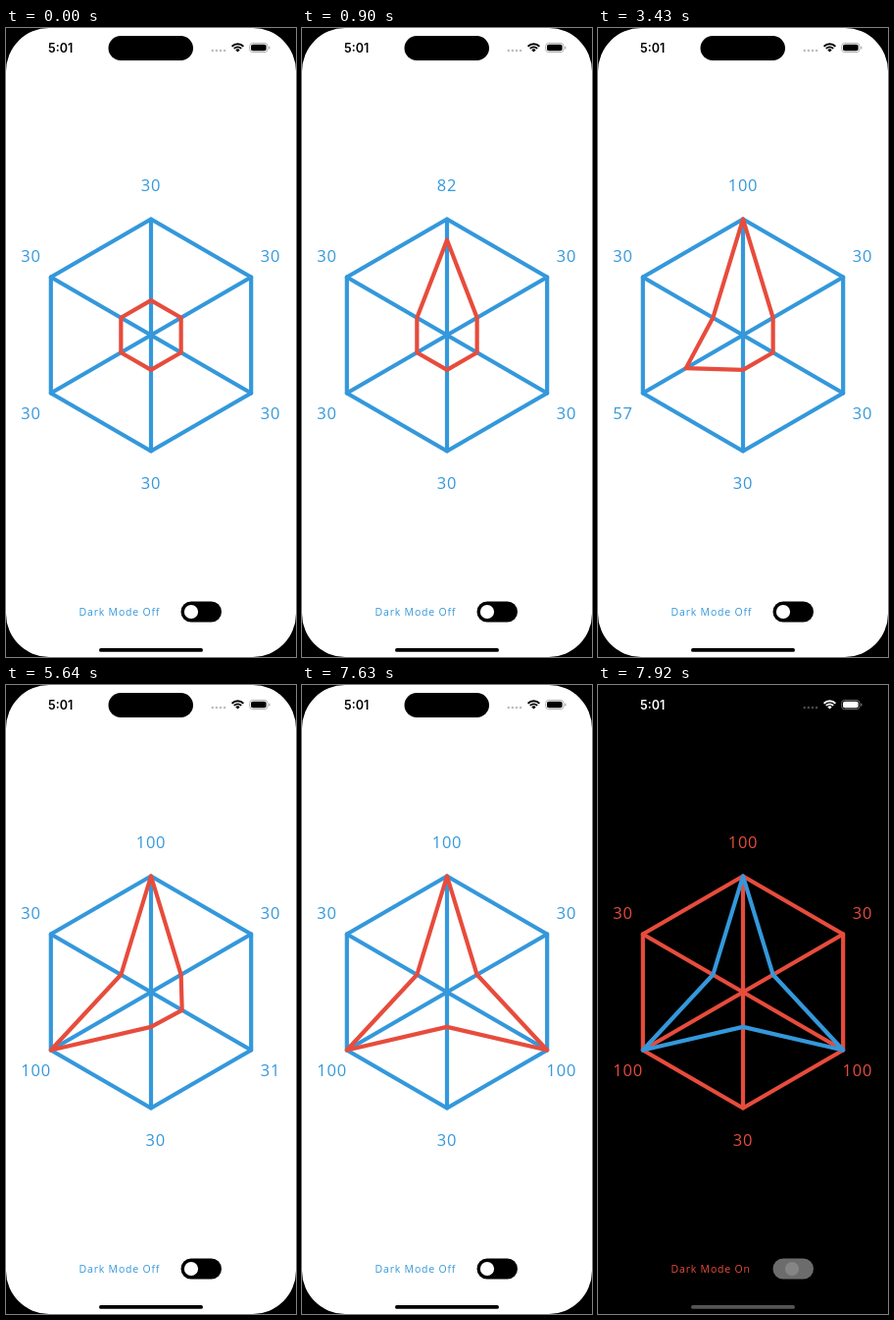
Animation, 296 px wide and 640 px high, one loop 8000 ms. Source, as an HTML page with a canvas:

```html
<!DOCTYPE html>
<html lang="en">
<head>
<meta charset="utf-8">
<title>Radar chart</title>
<style>
html, body { margin: 0; width: 100%; height: 100%; overflow: hidden; background: #000; }
canvas { display: block; width: 296px; height: 640px; }
</style>
</head>
<body>
<canvas id="stage"></canvas>
<script>
const W = 296, H = 640, LOOP = 8000;
const CX = 148, CY = 312.5, R = 118;
const BLUE = '#3498db', RED = '#e74c3c';

const canvas = document.getElementById('stage');
const ctx = canvas.getContext('2d');
const dpr = window.devicePixelRatio || 1;
canvas.width = W * dpr;
canvas.height = H * dpr;

// Held states: start time, top, lower left and lower right values
const STEPS = [
  [0, 30, 30, 30], [640, 31, 30, 30], [770, 57, 30, 30], [900, 82, 30, 30],
  [3320, 100, 31, 30], [3430, 100, 57, 30],
  [5640, 100, 100, 31], [5770, 100, 100, 57], [5880, 100, 100, 84],
  [7630, 100, 100, 100]
];
const FADE_AT = 7810, DARK_AT = 7920;

function pill(x, y, w, h, color, r = h / 2) {
  ctx.fillStyle = color;
  ctx.beginPath();
  ctx.roundRect(x, y, w, h, r);
  ctx.fill();
}

function disc(x, y, r, color) {
  ctx.fillStyle = color;
  ctx.beginPath();
  ctx.arc(x, y, r, 0, Math.PI * 2);
  ctx.fill();
}

function text(str, x, y, font, color, align = 'left', spacing = 0) {
  ctx.font = font;
  ctx.letterSpacing = spacing + 'px';
  ctx.textAlign = align;
  ctx.fillStyle = color;
  ctx.fillText(str, x, y);
}

// Corner i counts clockwise from the top
function corner(i, value) {
  const a = i * Math.PI / 3 - Math.PI / 2, r = R * value / 100;
  return [CX + r * Math.cos(a), CY + r * Math.sin(a)];
}

function polygon(values, color) {
  ctx.strokeStyle = color;
  ctx.beginPath();
  values.forEach((v, i) => ctx.lineTo(...corner(i, v)));
  ctx.closePath();
  ctx.stroke();
}

function chart(values, grid, shape) {
  ctx.lineWidth = 4.2;
  ctx.lineJoin = ctx.lineCap = 'round';
  polygon(Array(6).fill(100), grid);
  ctx.beginPath();
  for (let i = 0; i < 3; i++) {
    ctx.moveTo(...corner(i, 100));
    ctx.lineTo(...corner(i + 3, 100));
  }
  ctx.stroke();
  polygon(values, shape);
}

function labels(v, color) {
  const put = (n, x, y, align) =>
    text(String(n), x, y, '16.5px "Open Sans", sans-serif', color, align, 0.8);
  // A wider value on one side of the bottom row pushes its middle label
  const shift = 4.8 * ((v[4] > 99) - (v[2] > 99));
  put(v[0], 148, 166, 'center');
  put(v[1], 280.3, 237.5, 'right');
  put(v[2], 280.3, 398, 'right');
  put(v[3], 148 + shift, 469, 'center');
  put(v[4], 15.3, 398, 'left');
  put(v[5], 15.3, 237.5, 'left');
}

function statusBar(color, dots, rim) {
  text('5:01', 43, 24.5, '600 12.5px Inter, sans-serif', color);
  for (let i = 0; i < 4; i++) disc(210.8 + i * 4.1, 23.1, 1.25, dots);

  const from = -Math.PI * 0.75, to = -Math.PI * 0.25;
  ctx.strokeStyle = ctx.fillStyle = color;
  ctx.lineWidth = 1.9;
  ctx.lineCap = 'butt';
  for (const r of [8.3, 5.2]) {
    ctx.beginPath();
    ctx.arc(236.5, 24.6, r, from, to);
    ctx.stroke();
  }
  ctx.beginPath();
  ctx.moveTo(236.5, 24.6);
  ctx.arc(236.5, 24.6, 3.2, from, to);
  ctx.fill();

  ctx.strokeStyle = rim;
  ctx.lineWidth = 0.9;
  ctx.beginPath();
  ctx.roundRect(248.6, 15.4, 18.4, 9.2, 3);
  ctx.stroke();
  pill(250, 16.8, 15.6, 6.4, color, 1.8);
  pill(268.2, 18.5, 1.2, 3, rim, 0.6);
}

function draw(t) {
  const [, top, left, right] = STEPS.filter(s => s[0] <= t).pop();
  const values = [top, 30, right, 30, left, 30];
  const fading = t >= FADE_AT, dark = t >= DARK_AT;
  const main = dark ? RED : BLUE;

  ctx.setTransform(dpr, 0, 0, dpr, 0, 0);
  ctx.fillStyle = '#000';
  ctx.fillRect(0, 0, W, H);
  if (!dark) pill(0, 0, W, H, '#fff', 44);

  if (dark) statusBar('#fff', '#4a4a4a', '#777');
  else if (!fading) statusBar('#000', '#bdbdbd', '#aaa');
  pill(104.5, 8, 86.5, 25, '#000');

  chart(values, main, dark ? BLUE : RED);
  labels(values, main);

  text('Dark Mode ' + (dark ? 'On' : 'Off'), 74.6, 597.6,
    '10.5px "Open Sans", sans-serif', main, 'left', 0.8);
  pill(178.5, 583.5, 41.5, 21, dark ? '#6c6c6c' : fading ? '#1a1a1a' : '#000');
  disc(dark ? 198 : 189, 594, 7.1, dark ? '#858585' : '#fff');
  pill(95, 631, 106, 3.8, dark ? '#555' : '#000');
}

function tick(now) {
  draw(now % LOOP);
  requestAnimationFrame(tick);
}
draw(0);
requestAnimationFrame(tick);
</script>
</body>
</html>
```
